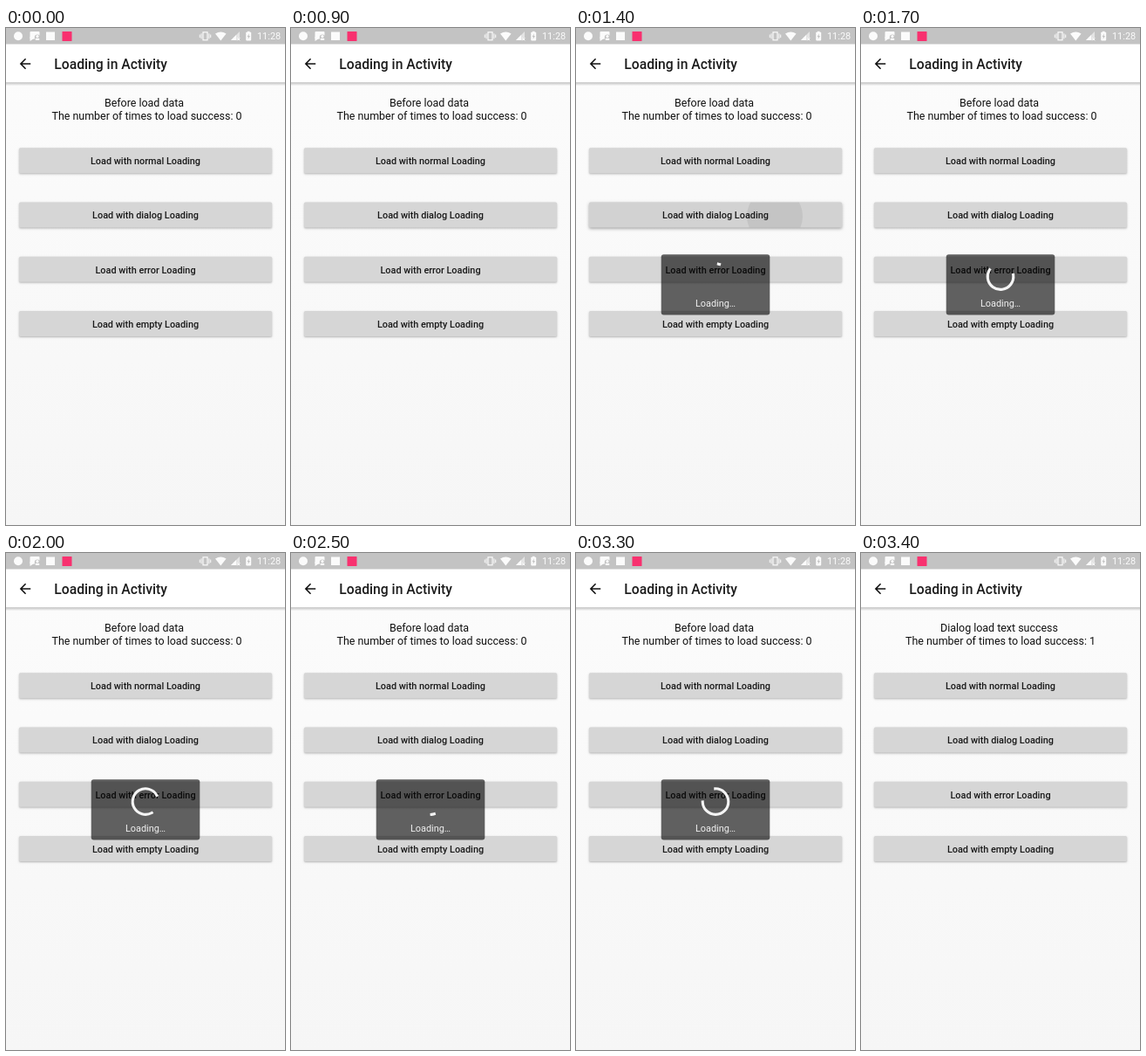
Animation, 320 px wide and 569 px high, one loop 5000 ms. Source, as an HTML page with a canvas:

```html
<!DOCTYPE html>
<html lang="en">
<head>
<meta charset="utf-8">
<title>Loading in Activity</title>
<style>
html, body { margin: 0; width: 100%; height: 100%; overflow: hidden; background: #f8f8f8; }
canvas { display: block; width: 320px; height: 569px; }
</style>
</head>
<body>
<canvas id="stage"></canvas>
<script>
const W = 320, H = 569, LOOP = 5000, STEP = 100;
const DP = 0.778;
const PRESS = 1200, DIALOG = 1400, SPIN = 1343, DONE = 3400;
const CYCLE = 1333;
const TAU = Math.PI * 2;
const LABELS = ["normal", "dialog", "error", "empty"];

const canvas = document.getElementById("stage");
const ctx = canvas.getContext("2d");
const ratio = window.devicePixelRatio || 1;
canvas.width = Math.round(W * ratio);
canvas.height = Math.round(H * ratio);
ctx.scale(ratio, ratio);

function text(str, x, y, size, color, weight = 400, align = "center") {
  ctx.font = `${weight} ${size}px Roboto, sans-serif`;
  ctx.textAlign = align;
  ctx.fillStyle = color;
  ctx.fillText(str, x, y);
}

function box(x, y, w, h, r, color) {
  ctx.fillStyle = color;
  ctx.beginPath();
  ctx.roundRect(x, y, w, h, r);
  ctx.fill();
}

function disc(x, y, r, color) {
  ctx.fillStyle = color;
  ctx.beginPath();
  ctx.arc(x, y, r, 0, TAU);
  ctx.fill();
}

function poly(color, ...pts) {
  ctx.fillStyle = color;
  ctx.beginPath();
  for (let i = 0; i < pts.length; i += 2) ctx.lineTo(pts[i], pts[i + 1]);
  ctx.fill();
}

function fade(y, h, from, to) {
  const g = ctx.createLinearGradient(0, y, 0, y + h);
  g.addColorStop(0, from);
  g.addColorStop(1, to);
  ctx.fillStyle = g;
  ctx.fillRect(0, y, W, h);
}

// y of a cubic curve from (x0, 0) to (x3, 1) with control heights 0 and 1
function ease(x, x0, x1, x2, x3) {
  if (x <= x0) return 0;
  if (x >= x3) return 1;
  let lo = 0, hi = 1;
  for (let i = 0; i < 30; i++) {
    const u = (lo + hi) / 2, v = 1 - u;
    const at = v * v * v * x0 + 3 * v * v * u * x1 + 3 * v * u * u * x2 + u * u * u * x3;
    if (at < x) lo = u; else hi = u;
  }
  return lo * lo * (3 - 2 * lo);
}

function statusBar() {
  const bar = "#c3c3c3", ink = "#fbfbfb";
  ctx.fillStyle = bar;
  ctx.fillRect(0, 0, W, 18.7);

  disc(14, 9.2, 5, ink);
  box(27.5, 4, 11, 8.5, 1, ink);
  poly(ink, 27.5, 10, 32, 12, 27.5, 15);
  disc(36, 10.8, 3.2, bar);
  disc(36, 9.6, 1.6, ink);
  box(33.6, 11.7, 4.8, 2.3, 1, ink);
  box(46, 4.5, 10, 9.5, 0, ink);
  box(64.5, 4, 11, 11, 0.5, "#f8316f");

  // vibrate
  ctx.strokeStyle = ink;
  ctx.lineWidth = 1.2;
  ctx.strokeRect(226, 4.8, 5, 9);
  for (const s of [-1, 1]) {
    ctx.fillStyle = ink;
    ctx.fillRect(228.5 + s * 4.4 - 0.5, 6.3, 1, 6);
    ctx.fillRect(228.5 + s * 6.2 - 0.5, 7.5, 1, 3.6);
  }

  // wifi
  ctx.fillStyle = ink;
  ctx.beginPath();
  ctx.moveTo(246.3, 14.5);
  ctx.lineTo(240, 6.6);
  ctx.quadraticCurveTo(246.3, 2.2, 252.6, 6.6);
  ctx.fill();

  // signal
  poly("rgba(255,255,255,.55)", 258, 14, 268, 4, 268, 14);
  poly(ink, 258, 14, 264, 8, 264, 14);
  ctx.lineWidth = 1;
  ctx.beginPath();
  ctx.moveTo(265.3, 11.3);
  ctx.lineTo(268.3, 14.3);
  ctx.moveTo(268.3, 11.3);
  ctx.lineTo(265.3, 14.3);
  ctx.stroke();

  // battery
  box(275.2, 4.8, 6, 9.6, 0.8, ink);
  box(276.8, 3.8, 2.8, 1.5, 0, ink);
  poly(bar, 278.9, 6.2, 276.5, 10.2, 278, 10.2, 277.6, 13, 280, 9, 278.5, 9);

  text("11:28", 288, 13.2, 10.9, ink, 400, "left");
}

function toolbar() {
  ctx.fillStyle = "#fff";
  ctx.fillRect(0, 18.7, W, 43.5);
  fade(62.2, 4, "rgba(0,0,0,.24)", "rgba(0,0,0,0)");

  ctx.save();
  ctx.translate(22, 41);
  ctx.scale(DP, DP);
  poly("#111", 8, -1, -4.17, -1, 1.42, -6.59, 0, -8, -8, 0, 0, 8, 1.41, 6.59, -4.17, 1, 8, 1);
  ctx.restore();
  text("Loading in Activity", 55.3, 46.6, 15.7, "#1c1c1c", 500, "left");
}

function button(label, y, pressed) {
  ctx.save();
  ctx.shadowColor = `rgba(0,0,0,${pressed ? 0.36 : 0.28})`;
  ctx.shadowBlur = (pressed ? 3.5 : 2.2) * ratio;
  ctx.shadowOffsetY = (pressed ? 1.4 : 1) * ratio;
  box(15, y, 290, 29, 1.5, pressed ? "#d2d2d2" : "#d6d6d6");
  ctx.restore();
}

function ripple(age, y) {
  const out = Math.max(0, age - 200);
  const r = 12 + age * 0.1 + out * 0.5;
  const alpha = 0.065 * (1 - out / 300);
  ctx.save();
  ctx.beginPath();
  ctx.roundRect(15, y, 290, 29, 1.5);
  ctx.clip();
  disc(228, y + 16, r, `rgba(0,0,0,${alpha})`);
  ctx.restore();
}

function spinner(age) {
  const turns = age / CYCLE, p = turns % 1;
  const start = 0.75 * ease(p, 0.5, 0.7, 0.6, 1);
  const end = 0.75 * ease(p, 0, 0.2, 0.1, 0.5);
  const shift = 0.25 * p + 0.6 * turns - 0.25;
  ctx.strokeStyle = "#f4f4f4";
  ctx.lineWidth = 4 * DP;
  ctx.lineCap = "square";
  ctx.beginPath();
  ctx.arc(160, 284.6, 19 * DP, (start + shift) * TAU, (end + shift) * TAU);
  ctx.stroke();
  ctx.lineCap = "butt";
}

function draw(t) {
  fade(0, H, "#fcfcfc", "#f6f6f6");
  statusBar();
  toolbar();

  const done = t >= DONE;
  text(done ? "Dialog load text success" : "Before load data", 158.5, 90, 12.44, "#101010");
  text("The number of times to load success: " + (done ? 1 : 0),
    done ? 160 : 161.5, 104.5, 12.44, "#101010");

  const age = t - PRESS;
  LABELS.forEach((name, i) => {
    const y = 137.2 + i * 62.25;
    const hit = i === 1 && age >= 0 && age < 500;
    button(name, y, hit && age < 400);
    if (hit) ripple(age, y);
    text(`Load with ${name} Loading`, 160, y + 18.8, 10.89, "#191919", 500);
  });

  if (t >= DIALOG && !done) {
    box(97.7, 259.2, 124.6, 69.4, 3, "rgba(0,0,0,.61)");
    spinner(t - SPIN);
    text("Loading…", 160, 319, 10.89, "#f0f0f0");
  }
}

const began = performance.now();
function tick() {
  const t = (performance.now() - began) % LOOP;
  draw(Math.floor(t / STEP) * STEP);
  requestAnimationFrame(tick);
}
tick();
</script>
</body>
</html>
```
